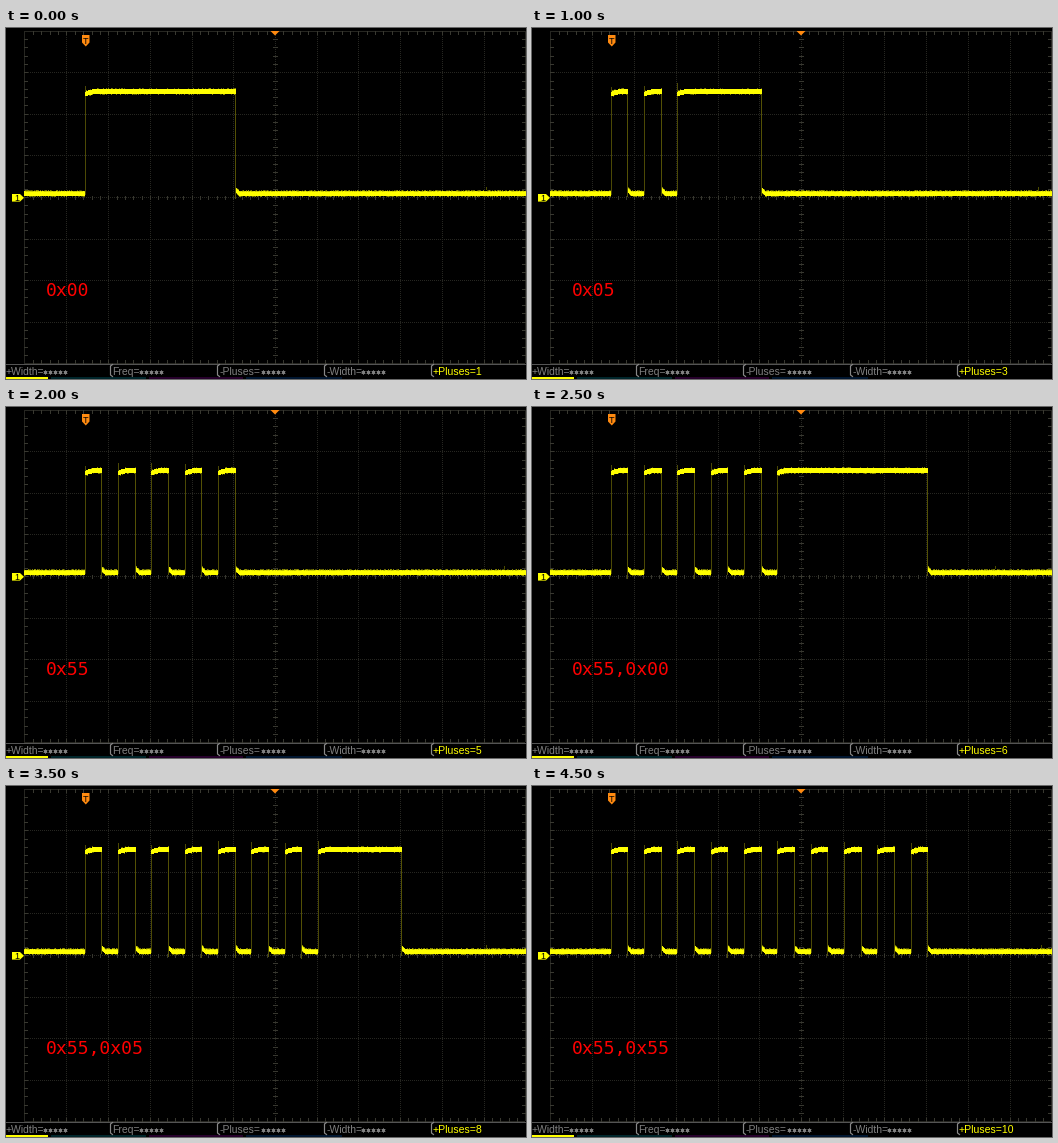
These frames come from a looping animation (520 by 351 pixels, 5000 ms). A matplotlib script:

```python
import numpy as np
import matplotlib.pyplot as plt
from matplotlib.animation import FuncAnimation
from matplotlib.patches import Polygon

W, H, DPI = 520, 351, 100
LEFT, RIGHT, TOP, BOTTOM = 18, 519, 3, 335
DIV_X, DIV_Y = 41.7, 41.6
MID_X, MID_Y = 269, 169
START, BIT = 79.2, 16.67
HIGH_Y, LOW_Y = 62.9, 165.1
YELLOW, ORANGE, GRAY = (1, 1, 0), "#ff8a10", "#808080"

VALUES = [0x00, 0x01, 0x05, 0x15, 0x55]
MESSAGES = [[v] for v in VALUES] + [[0x55, v] for v in VALUES]


def px(size):
    return size * 72 / DPI


def make_grid():
    img = np.zeros((H, W, 3))
    dot, tick = (0.15, 0.15, 0.13), (0.22, 0.22, 0.19)
    for i in range(-5, 6):
        img[TOP:BOTTOM:2, round(MID_X + i * DIV_X)] = dot
    for j in range(-3, 4):
        img[round(MID_Y + j * DIV_Y), LEFT:RIGHT:2] = dot
    img[[TOP, BOTTOM], LEFT:RIGHT] = dot
    img[TOP:BOTTOM, [LEFT, RIGHT]] = dot
    for i in range(-29, 30):
        x = round(MID_X + i * DIV_X / 5)
        img[MID_Y - 1:MID_Y + 3, x] = tick
        img[TOP:TOP + 4, x] = tick
        img[BOTTOM - 3:BOTTOM + 1, x] = tick
    for j in range(-19, 20):
        y = round(MID_Y + j * DIV_Y / 5)
        img[y, MID_X - 2:MID_X + 3] = tick
        img[y, LEFT:LEFT + 4] = tick
        img[y, RIGHT - 3:RIGHT + 1] = tick
    # measurement bar and channel strip
    img[336] = 0.33
    img[349:, :42] = YELLOW
    img[349:, 45:140] = (0, 0.15, 0.17)
    img[349:, 143:237] = (0.15, 0, 0.17)
    img[349:, 240:336] = (0, 0.09, 0.19)
    return img


def line_levels(data):
    """Inverted serial line: start bit high, data LSB first, stop bit low."""
    levels = []
    for byte in data:
        levels += [1] + [1 - (byte >> k & 1) for k in range(8)] + [0]
    return levels


def find_edges(data):
    edges, last = [], 0
    for k, level in enumerate(line_levels(data)):
        if level != last:
            edges.append((int(START + k * BIT), level))
            last = level
    return edges


def draw_trace(img, edges, rng):
    for x in range(LEFT, W):
        level, since = 0, 999
        for edge, rising in edges:
            if x >= edge + 1 - rising:
                level, since = rising, x - edge
        if level:
            mid = HIGH_Y + 3.2 * np.exp(-since / 4)
        else:
            mid = LOW_Y - 3 * np.exp(-(since / 3) ** 2)
        y0 = int(round(mid - 2))
        y1 = y0 + 5
        for y in (y0 - 1, y1):
            if rng.random() < (0.25 if level else 0.6):
                img[y, x] = np.array(YELLOW) * rng.uniform(0.2, 0.6)
        img[y0:y1, x] = YELLOW
        if not level:
            img[y0, x] = np.array(YELLOW) * rng.uniform(0.75, 1)
    # thin edges with uneven overshoot
    for x, rising in edges:
        if rising:
            img[rng.integers(55, 60):64, x] = (0.3, 0.29, 0.02)
            img[68:167, x] = (0.3, 0.29, 0.02)
        else:
            img[66:rng.integers(168, 174), x] = (0.33, 0.32, 0.02)
    # one stray spike on the idle line
    x = int(rng.integers(405, 515))
    img[159:162, x] = (0.3, 0.3, 0)


fig = plt.figure(figsize=(W / DPI, H / DPI), dpi=DPI, facecolor="black")
ax = fig.add_axes([0, 0, 1, 1])
ax.axis("off")

grid = make_grid()
screen = ax.imshow(grid, extent=(0, W, H, 0), interpolation="nearest",
                   aspect="auto", vmin=0, vmax=1)
ax.set_xlim(0, W)
ax.set_ylim(H, 0)


def shape(points, color):
    ax.add_patch(Polygon(points, closed=True, fc=color, ec="none", zorder=3))


def label(x, y, s, size, color, **kw):
    kw.setdefault("family", "Liberation Sans")
    return ax.text(x, y, s, fontsize=px(size), color=color, va="baseline",
                   zorder=4, **kw)


shape([(76, 7), (83.5, 7), (83.5, 14.5), (79.8, 18.5), (76, 14.5)], ORANGE)
label(79.8, 15.5, "T", 9, "black", ha="center")
shape([(264.5, 3), (273.5, 3), (269, 7.5)], ORANGE)
shape([(6, 166), (14, 166), (18, 169.8), (14, 173.6), (6, 173.6)], YELLOW)
label(11, 173, "1", 9, "black", ha="center")

for x, name, stars in [(-0.5, "+Width=", 36), (106.5, "Freq=", 132),
                       (213.5, "-Pluses=", 254), (320.5, "-Width=", 354)]:
    label(x, 347, name, 10.4, GRAY)
    ax.plot(stars + 2.5 + 5 * np.arange(5), [343.5] * 5, ls="none",
            marker=(6, 2), ms=px(4), mew=px(0.7), color=GRAY, zorder=4)
for x in (104.5, 211.5, 318.5, 425.5):
    ax.plot([x + 2, x, x, x + 2], [336.5, 338, 347, 348.5],
            color="#888888", lw=px(1.2), zorder=3)

count = label(426.7, 347, "", 10.5, YELLOW)
code = label(39.5, 268.5, "", 18.2, "#ff0000", family="DejaVu Sans Mono")


def update(i):
    data = MESSAGES[i]
    edges = find_edges(data)
    img = grid.copy()
    draw_trace(img, edges, np.random.default_rng(40 + i))
    screen.set_data(img)
    count.set_text(f"+Pluses={sum(rising for _, rising in edges)}")
    code.set_text(",".join(f"0x{b:02X}" for b in data))
    return screen, count, code


anim = FuncAnimation(fig, update, frames=len(MESSAGES), interval=500,
                     repeat=True, repeat_delay=0, blit=False)
plt.show()
```
